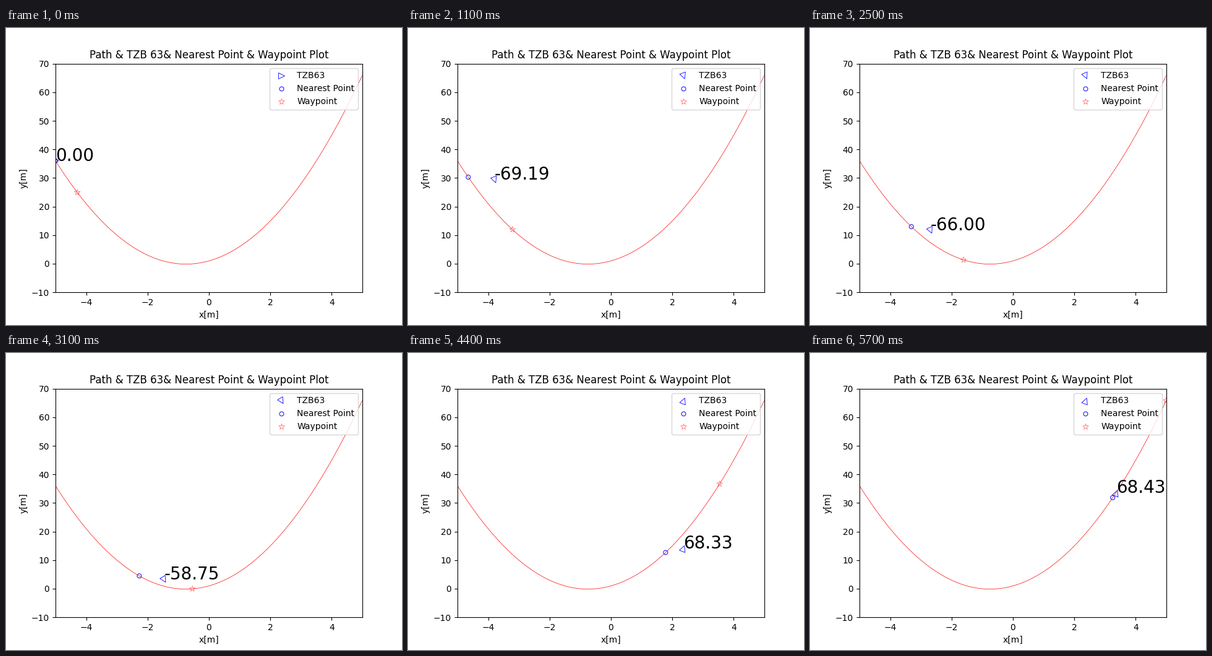
A matplotlib script that plays this animation: 640 px wide and 480 px high, repeating every 5.8 s.

```python
import numpy as np
import matplotlib.pyplot as plt
from matplotlib.animation import FuncAnimation
from matplotlib.markers import MarkerStyle

FRAMES, INTERVAL = 58, 100
DT = 0.1             # simulation step [s]
CRUISE = 15.0        # target speed [m/s]
GAIN, BASE = 0.1, 1.0  # look-ahead = GAIN * v + BASE
STEP = 0.01          # path spacing in x [m]

path_x = np.arange(-5, 5, STEP)
path_y = 2 * path_x**2 + 3 * path_x + 1


def simulate():
    """Pure pursuit along the path; one (pose, nearest, waypoint) per frame."""
    x, y, yaw, v = path_x[0], path_y[0], 0.0, 0.0
    log = []
    for _ in range(FRAMES):
        near = int(np.argmin(np.hypot(path_x - x, path_y - y)))
        look = GAIN * v + BASE
        ahead = int(np.ceil(look / (np.sqrt(2) * STEP)))
        goal = min(near + ahead, len(path_x) - 1)
        alpha = np.arctan2(path_y[goal] - y, path_x[goal] - x) - yaw
        x += v * np.cos(yaw) * DT
        y += v * np.sin(yaw) * DT
        yaw += 2 * v * np.sin(alpha) / look * DT
        v += (CRUISE - v) * DT
        log.append(((x, y, yaw), near, goal))
    return log


def arrow(angle):
    marker = MarkerStyle(">").rotated(deg=angle)
    return marker.get_path().transformed(marker.get_transform())


log = simulate()

fig, ax = plt.subplots(figsize=(6.4, 4.8), dpi=100)
ax.plot(path_x, path_y, "r-", lw=0.5)


def hollow(marker, color, size, width, label):
    return ax.scatter([path_x[0]], [path_y[0]], s=size, marker=marker,
                      facecolors="none", edgecolors=color, linewidths=width,
                      label=label)


car = hollow(">", "blue", 50, 0.6, "TZB63")
nearest = hollow("o", "blue", 25, 0.7, "Nearest Point")
waypoint = hollow("*", "red", 50, 0.3, "Waypoint")
label = ax.text(path_x[0], path_y[0], "", fontsize=20)

ax.set(xlim=(-5, 5), ylim=(-10, 70), xlabel="x[m]", ylabel="y[m]",
       title="Path & TZB 63& Nearest Point & Waypoint Plot")
legend = ax.legend(loc="upper right")
car_key = legend.legend_handles[0]


def update(i):
    (x, y, yaw), near, goal = log[i]
    angle = yaw * 45
    shape = [arrow(angle)]
    car.set_paths(shape)
    car_key.set_paths(shape)
    car.set_offsets([(x, y)])
    nearest.set_offsets([(path_x[near], path_y[near])])
    waypoint.set_offsets([(path_x[goal], path_y[goal])])
    label.set_position((x, y))
    label.set_text(f"{angle:.2f}")
    return car, nearest, waypoint, label


anim = FuncAnimation(fig, update, frames=FRAMES, interval=INTERVAL,
                     repeat=True, repeat_delay=0, blit=False)
plt.show()
```
